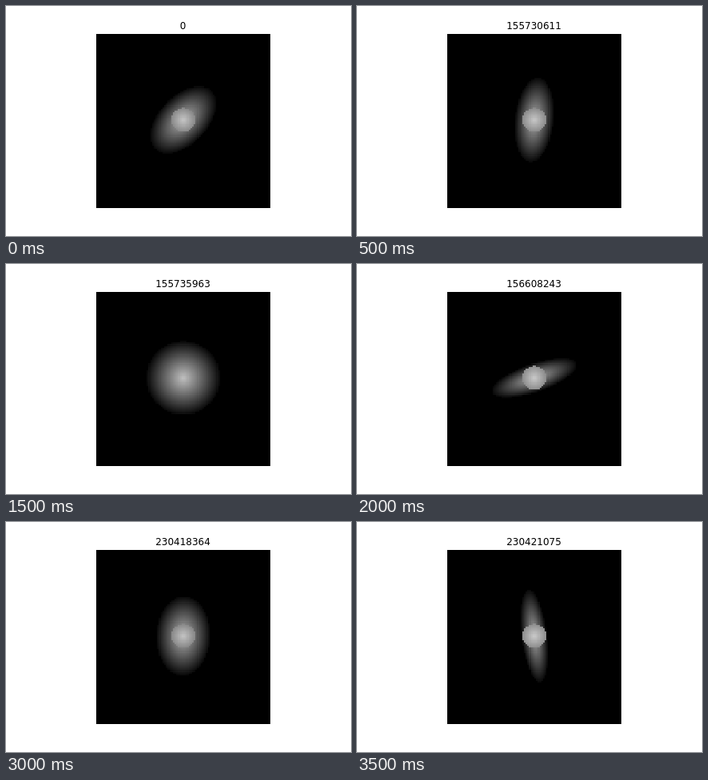
An HTML page with a canvas that plays this animation: 432x288 px, repeating every 4 s.

```html
<!DOCTYPE html>
<html>
<head>
<meta charset="utf-8">
<style>
html, body { margin: 0; overflow: hidden; background: #fff; }
canvas { display: block; }
</style>
</head>
<body>
<canvas id="stage" width="432" height="288"></canvas>
<script>
const ctx = document.getElementById('stage').getContext('2d');
const STEP = 500, CELLS = 100;
const LEFT = 113, TOP = 35, SIZE = 218;
const CX = 222, CY = 142.7, BULGE = 15;

// id, semi-major axis, semi-minor axis, tilt in degrees
const galaxies = [
  ['0', 50.5, 30, 46],
  ['155730611', 53, 24, 84],
  ['155732322', 59.5, 12.8, 17],
  ['155735963', 46, 46, 0],
  ['156608243', 55.7, 17.5, 19],
  ['156625245', 50, 32, 65],
  ['230418364', 49.5, 33.5, 88],
  ['230421075', 58.4, 15.6, 97]
];

const edge = (start, i) => start + Math.round(i * SIZE / CELLS);

function brightness(x, y, a, b, tilt) {
  const c = Math.cos(tilt), s = Math.sin(tilt);
  const rho = Math.hypot((x * c - y * s) / a, (x * s + y * c) / b);
  const r = Math.hypot(x, y), q = b / a;
  const disc = rho < 1 ? 8 + (147 + 37 * q) * (1 - rho) : 0;
  const bulge = r < BULGE ? 206 - 14 * q - 4.1 * r : 0;
  return Math.round(Math.max(disc, bulge));
}

function draw([id, a, b, degrees]) {
  ctx.fillStyle = '#fff';
  ctx.fillRect(0, 0, 432, 288);
  ctx.fillStyle = '#000';
  ctx.font = '12px "DejaVu Sans", sans-serif';
  ctx.textAlign = 'center';
  ctx.fillText(id, 221.5, 29);
  ctx.fillRect(LEFT, TOP, SIZE, SIZE);
  for (let row = 0; row < CELLS; row++) {
    const y = edge(TOP, row), h = edge(TOP, row + 1) - y;
    for (let col = 0; col < CELLS; col++) {
      const x = edge(LEFT, col), w = edge(LEFT, col + 1) - x;
      const v = brightness(x + w / 2 - CX, CY - y - h / 2, a, b, -degrees * Math.PI / 180);
      if (!v) continue;
      ctx.fillStyle = `rgb(${v},${v},${v})`;
      ctx.fillRect(x, y, w, h);
    }
  }
}

const start = performance.now();
let shown = -1;
function tick() {
  const index = Math.floor((performance.now() - start) / STEP) % galaxies.length;
  if (index !== shown) draw(galaxies[shown = index]);
  requestAnimationFrame(tick);
}
tick();
</script>
</body>
</html>
```
